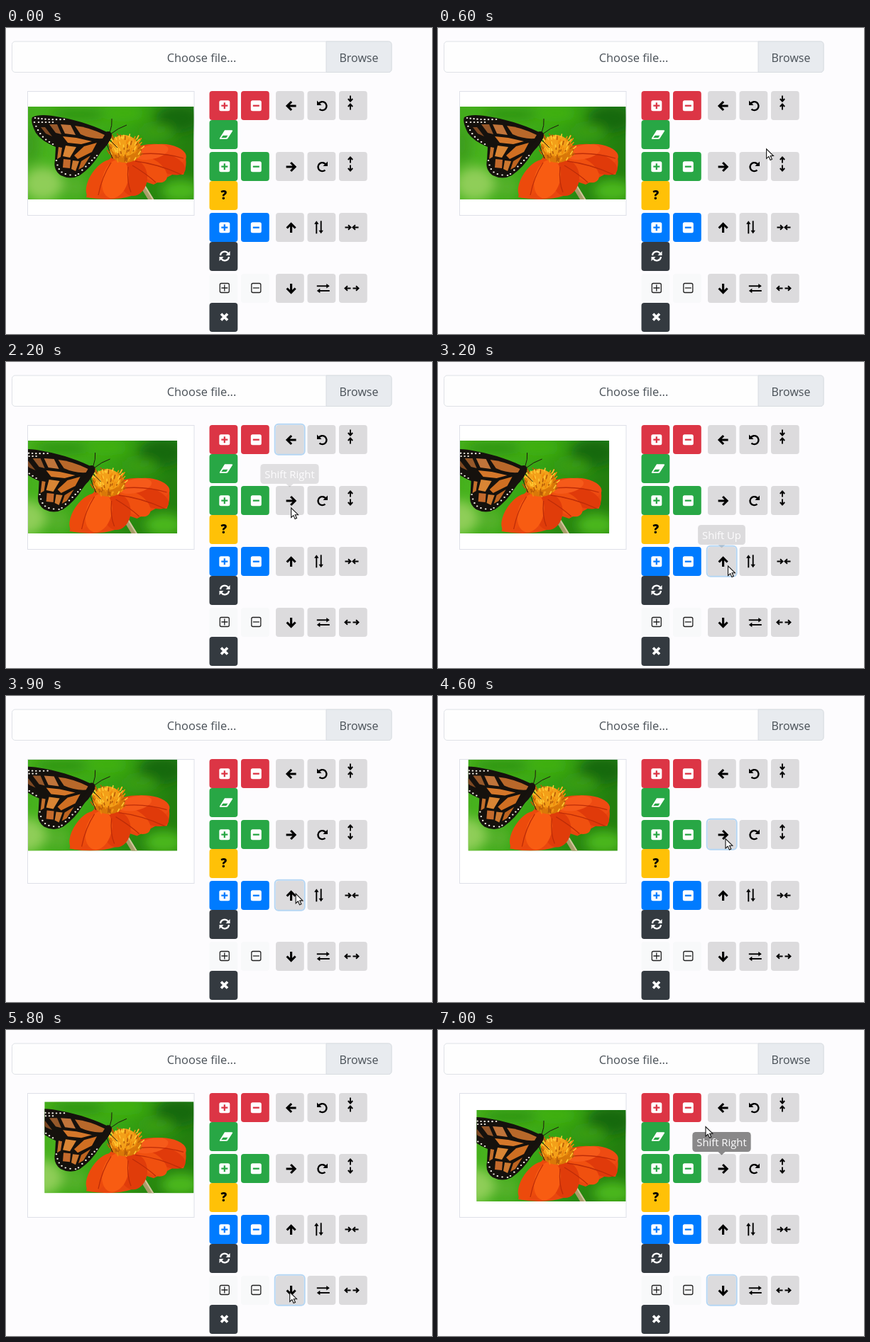
Animation of 600x432 px, one loop 7100 ms. Source, as an HTML page:

```html
<!DOCTYPE html>
<html lang="en">
<head>
<meta charset="utf-8">
<title>Image tools</title>
<style>
html, body { margin: 0; height: 100%; overflow: hidden; background: #fdfcfe }
svg { display: block; font-family: "Open Sans", "Noto Sans", sans-serif }
</style>
</head>
<body>
<svg id="stage" width="600" height="432" viewBox="0 0 600 432"></svg>
<script>
const LOOP = 7100, STEP = 11.7;
const rows = [89, 175, 261, 347], cols = [286.5, 331, 380, 424.5, 469];
const line = (d, color, w, extra = '') =>
  `<path d="${d}" fill="none" stroke="${color}" stroke-width="${w}" ${extra}/>`;
const shape = (d, color) => `<path d="${d}" fill="${color}"/>`;
const oval = (x, y, rx, ry, color, rot = 0) =>
  `<ellipse cx="${x}" cy="${y}" rx="${rx}" ry="${ry}" fill="${color}" transform="rotate(${rot} ${x} ${y})"/>`;
const at = (x, y, body, rot = 0, flip = 1) =>
  `<g transform="translate(${x} ${y}) rotate(${rot}) scale(${flip} 1)">${body}</g>`;
const button = (x, y, color) =>
  `<rect x="${x}" y="${y}" width="39.8" height="41" rx="4" fill="${color}"/>`;

let seed = 7;
const rand = () => (seed = seed * 16807 % 2147483647) / 2147483647;

function photo() {
  let s = `<rect x="31" y="111" width="233.5" height="131" fill="url(#leaf)"/>
    <g filter="url(#soft)">
      ${oval(52, 220, 28, 24, '#8fce58')}${oval(34, 165, 12, 26, '#3c9c1c')}
      ${oval(102, 122, 40, 10, '#2d9410')}${oval(165, 120, 30, 12, '#3fb010')}
      ${oval(243, 128, 32, 20, '#17690a')}${oval(212, 146, 24, 9, '#3a9f16')}
      ${oval(246, 230, 28, 16, '#4cb81e')}${oval(98, 224, 16, 16, '#54b02c')}
    </g>`;
  s += line('M187 214L206 245', '#a99d6a', 7) + line('M190 214L209 245', '#d0c79b', 2);
  // petals
  s += shape('M148 183L190 166Q224 158 252 178Q256 192 250 207L236 206L208 221L196 217L180 236Q150 246 113 239Q116 212 148 183Z', '#e8470e');
  s += oval(224, 179, 30, 15, '#ee4b12', 6) + oval(228, 192, 26, 13, '#e03a0a', 22)
    + oval(205, 200, 25, 14, '#f0500f', 35) + oval(134, 213, 31, 15, '#ec4a0c', -56)
    + oval(180, 212, 19, 25, '#e03c0a', 5) + oval(154, 213, 18, 28, '#f85c12', 16)
    + oval(205, 175, 24, 10, '#f65a1a', -12);
  s += line('M182 188Q215 192 247 207M188 178Q220 175 250 184M172 196Q170 218 176 232M148 190Q135 210 130 236M178 194Q198 206 211 218',
    '#bd2c08', 1.3);
  // flower head
  s += oval(168, 172, 23, 18, '#d97808') + oval(166, 166, 19, 15, '#f3a019');
  for (let i = 0; i < 90; i++) {
    const a = rand() * 6.283, r = Math.sqrt(rand());
    const x = 167 + 25 * r * Math.cos(a), y = 170 + 21 * r * Math.sin(a);
    s += line(`M${x} ${y}l${(x - 167) / 7} ${-2 - 3 * rand()}`,
      ['#ffc933', '#f08a0c', '#b75a08'][i % 3], 1.6, 'stroke-linecap="round"');
  }
  // wings
  s += shape('M147 149C128 140 105 131 77 126Q48 120 37 126Q34 132 42 148Q49 159 70 168L69 186Q66 200 77 208Q91 215 104 208Q121 196 131 179L146 158Z', '#15110d');
  s += shape('M139 151Q117 140 97 138L105 150Q120 157 136 156Z', '#b8682a')
    + shape('M91 137L77 136L83 149L98 151Z', '#c0743a')
    + shape('M72 136L61 136L70 148L78 150Z', '#96582a')
    + shape('M55 140L49 140L56 149L65 153Z', '#7d4822')
    + shape('M80 153L99 155L121 160L106 164L87 162Z', '#d4772a')
    + shape('M128 162L110 167L96 180L101 185L121 175Z', '#cf6f22')
    + shape('M99 168L84 166L80 181L90 183Z', '#d98534')
    + shape('M81 185L91 186L90 198L80 197Z', '#c46a2c')
    + shape('M94 187L103 188L98 202L92 199Z', '#cc7830')
    + shape('M106 188L119 180L109 196L102 200Z', '#bd6420')
    + shape('M79 169L74 168L72 185L77 182Z', '#c4702c');
  const spots = (n, x0, y0, x1, y1, bend) => {
    for (let i = 0; i < n; i++) {
      const u = i / (n - 1), b = bend * Math.sin(Math.PI * u);
      s += oval(x0 + (x1 - x0) * u - b, y0 + (y1 - y0) * u + b, 1.3, 1.1, '#f2eee4');
    }
  };
  spots(9, 41, 127, 82, 129, 1); spots(8, 40, 133, 66, 164, 3); spots(5, 46, 133, 66, 133, 0);
  spots(7, 71, 187, 98, 208, 6); spots(7, 102, 206, 128, 180, -2);
  s += line('M126 176Q138 168 145 154', '#17120e', 7, 'stroke-linecap="round"') + oval(144, 151, 5, 5, '#17120e');
  return s + line('M146 148Q150 137 149 128M147 150Q158 141 170 137M142 164L150 184M145 157L157 169', '#20170f', 1);
}

const square = (d, hole) =>
  `<rect x="-7.5" y="-7.5" width="15" height="15" rx="2.5" fill="#fff"/>` + line(d, hole, 2.3);
const outline = d =>
  `<rect x="-6.5" y="-6.5" width="13" height="13" rx="2" fill="none" stroke="#222" stroke-width="1.3"/>` + line(d, '#222', 1.3);
const arrow = line('M-7 0H6M-.5 -6L5.5 0L-.5 6', '#000', 3.1);
const small = line('M-4.5 0H3M0 -3.2L3.5 0L0 3.2', '#000', 1.9);
const long = line('M-9 0H7', '#000', 1.9) + shape('M4.5 -3.2L9 0L4.5 3.2Z', '#000');
const turn = line('M-5 -3.2A6 6 0 1 1 -4 4.6', '#000', 2.4) + shape('M-7.5 -7.5V-1H-1Z', '#000');

function controls() {
  const fills = ['#dc3545', '#28a745', '#007bff', '#f8f9fa'];
  const minus = 'M-4.5 0H4.5', plus = minus + 'M0 -4.5V4.5';
  let s = '';
  rows.forEach((y, i) => {
    cols.forEach((x, j) => s += button(x, y, j < 2 ? fills[i] : '#dcdbdd'));
    [plus, minus].forEach((d, j) => s += at(307.8 + 44.5 * j, y + 20.7 - (i > 2 ? .7 : 0),
      i < 3 ? square(d, fills[i]) : outline(d)));
    s += at(401.6, y + 21, arrow, [180, 0, -90, 90][i]);
    s += button(cols[0], y + 41, ['#28a745', '#ffc107', '#343a40', '#343a40'][i]);
  });
  s += at(445.5, 110, turn) + at(445.5, 196, turn, 0, -1);
  s += at(437.3, 281.3, long, -90) + at(443.7, 281.3, long, 90);
  s += at(446.8, 364.3, long) + at(446.8, 371, long, 180);
  s += at(485, 100, small, 90) + at(485, 111, small, -90);
  s += at(485, 186, small, -90) + at(485, 198, small, 90);
  s += at(482, 281.5, small) + at(492, 281.5, small, 180);
  s += at(481, 367.5, small, 180) + at(493, 367.5, small);
  s += at(310, 150.5, shape('M-2 -6.3H8Q10 -6.3 8.7 -4.5L2.3 5.5Q1.8 6.3 .5 6.3H-8Q-10 6.3 -8.7 4.5Z', '#fff')
    + shape('M-4.4 1.2H2.4L.2 4.4H-6.8Z', '#28a745'));
  s += `<text x="306.7" y="242.3" font-size="17" font-weight="800" text-anchor="middle">?</text>`;
  s += at(308, 322, line('M-6 -1A6 6 0 0 1 4.8 -3.8M6 1A6 6 0 0 1 -4.8 3.8', '#fff', 2.3)
    + shape('M7.5 -7V-1H1.5ZM-7.5 7V1H-1.5Z', '#fff'));
  return s + at(307.5, 408, line('M-4.5 -4.5L4.5 4.5M4.5 -4.5L-4.5 4.5', '#fff', 3.7));
}

const stage = document.getElementById('stage');
stage.innerHTML = `<defs>
  <linearGradient id="leaf" x2="1" y2=".25"><stop stop-color="#43ac1c"/><stop offset=".3" stop-color="#48b31e"/>
    <stop offset=".6" stop-color="#36a414"/><stop offset="1" stop-color="#237f0e"/></linearGradient>
  <filter id="soft" x="-20%" y="-20%" width="140%" height="140%"><feGaussianBlur stdDeviation="8"/></filter>
  <clipPath id="frame"><rect x="31" y="89.7" width="233.5" height="174"/></clipPath>
  <clipPath id="kept"><rect id="crop" width="300" height="200"/></clipPath>
  <clipPath id="whole"><rect x="31" y="111" width="233.5" height="131"/></clipPath>
</defs>
<rect width="600" height="432" fill="#fdfcfe"/>
<rect x="8.5" y="19" width="534.5" height="43.5" rx="4.5" fill="#fefefe" stroke="#dfe2e7"/>
<path d="M451 19H538.5Q543 19 543 23.5V58Q543 62.5 538.5 62.5H451Z" fill="#e8ebef" stroke="#d8dce1"/>
<g fill="#495057" font-size="16.4" text-anchor="middle">
  <text x="275.5" y="47.8">Choose file...</text><text x="497" y="47.8" font-size="16">Browse</text></g>
<rect x="30.5" y="89.5" width="234.5" height="175" fill="#fff" stroke="#dee0e8"/>
<g clip-path="url(#frame)"><g id="photo"><g clip-path="url(#kept)"><g clip-path="url(#whole)">${photo()}</g></g></g></g>
${controls()}
<rect id="focus" x="378.7" width="42" height="43" rx="5" fill="none" stroke="#b5d6f3" stroke-width="2"/>
<g id="tips"></g>
<path id="cursor" d="M0 0V13.5L3.2 10.6L5.4 15.6L7.8 14.5L5.6 9.7H9.8Z" fill="#fff" stroke="#111" stroke-width="1.1"/>`;

// [start, row]
const focuses = [[1100, 0], [3100, 2], [4400, 1], [5600, 3]];
// [time, dx, dy]
const shifts = [[1400, -1, 0], [1700, -1, 0], [3300, 0, -1], [3700, 0, -1],
  [4500, 1, 0], [5000, 1, 0], [5700, 0, 1], [6100, 0, 1]];
// [time, x, y]
const path = [[100, 598, 285], [900, 400, 118], [1300, 396.5, 113], [1800, 396.5, 113],
  [2200, 401.7, 206], [2600, 402, 212], [2900, 408, 280], [3200, 408.5, 288], [3800, 408.5, 288],
  [4300, 405, 203], [4600, 405, 201.5], [5050, 405, 201.5], [5500, 400, 365], [5800, 399.7, 370],
  [6300, 399.7, 370], [7000, 377, 136.5]];
// [row, show, hide]
const tips = [[0, 850, 1167], [1, 2182, 2660], [2, 2800, 3071], [1, 4080, 4350],
  [2, 5150, 5300], [3, 5380, 5580], [2, 6440, 6620], [1, 6700, 6926]];
const names = ['Shift Left', 'Shift Right', 'Shift Up', 'Shift Down'];

const get = id => document.getElementById(id);
const set = (el, attrs) => { for (const k in attrs) el.setAttribute(k, attrs[k]); };
const clamp = v => Math.max(0, Math.min(1, v));

get('tips').innerHTML = names.map((name, i) => `<g transform="translate(399.5 ${rows[i] - 31})">
  <rect height="28" rx="4.5"/><path d="M-5 28H5L0 32.5Z"/>
  <text y="19.5" font-size="14.8" fill="#fff" text-anchor="middle">${name}</text></g>`).join('');
const bubbles = [...get('tips').children];
for (const b of bubbles) {
  const w = b.querySelector('text').getComputedTextLength() + 12;
  set(b.querySelector('rect'), { x: -w / 2, width: w });
}

function draw(now) {
  const t = Math.floor(now % LOOP / 100) * 100;

  let x = 0, y = 0, minX = 0, minY = 0;
  for (const [when, dx, dy] of shifts) if (when <= t) {
    x += dx * STEP; y += dy * STEP;
    minX = Math.min(minX, x); minY = Math.min(minY, y);
  }
  set(get('photo'), { transform: `translate(${x} ${y})` });
  set(get('crop'), { x: 31 - minX, y: 89.7 - minY });

  const focus = focuses.filter(f => f[0] <= t).pop();
  set(get('focus'), { y: focus ? rows[focus[1]] - 1.2 : 0, opacity: focus ? 1 : 0 });

  bubbles.forEach((b, i) => {
    const alpha = Math.max(...tips.filter(p => p[0] === i)
      .map(([, show, hide]) => clamp(Math.min((t - show) / 150, 1 - (t - hide) / 150))));
    set(b, { opacity: .9 * alpha });
  });

  const next = Math.max(1, path.findIndex(p => p[0] >= t));
  const [t0, x0, y0] = path[next - 1], [t1, x1, y1] = path[next];
  const u = clamp((t - t0) / (t1 - t0)), e = u * u * (3 - 2 * u);
  set(get('cursor'), {
    transform: `translate(${x0 + (x1 - x0) * e} ${y0 + (y1 - y0) * e})`, opacity: t < 100 ? 0 : 1
  });
  requestAnimationFrame(draw);
}
requestAnimationFrame(draw);
</script>
</body>
</html>
```
